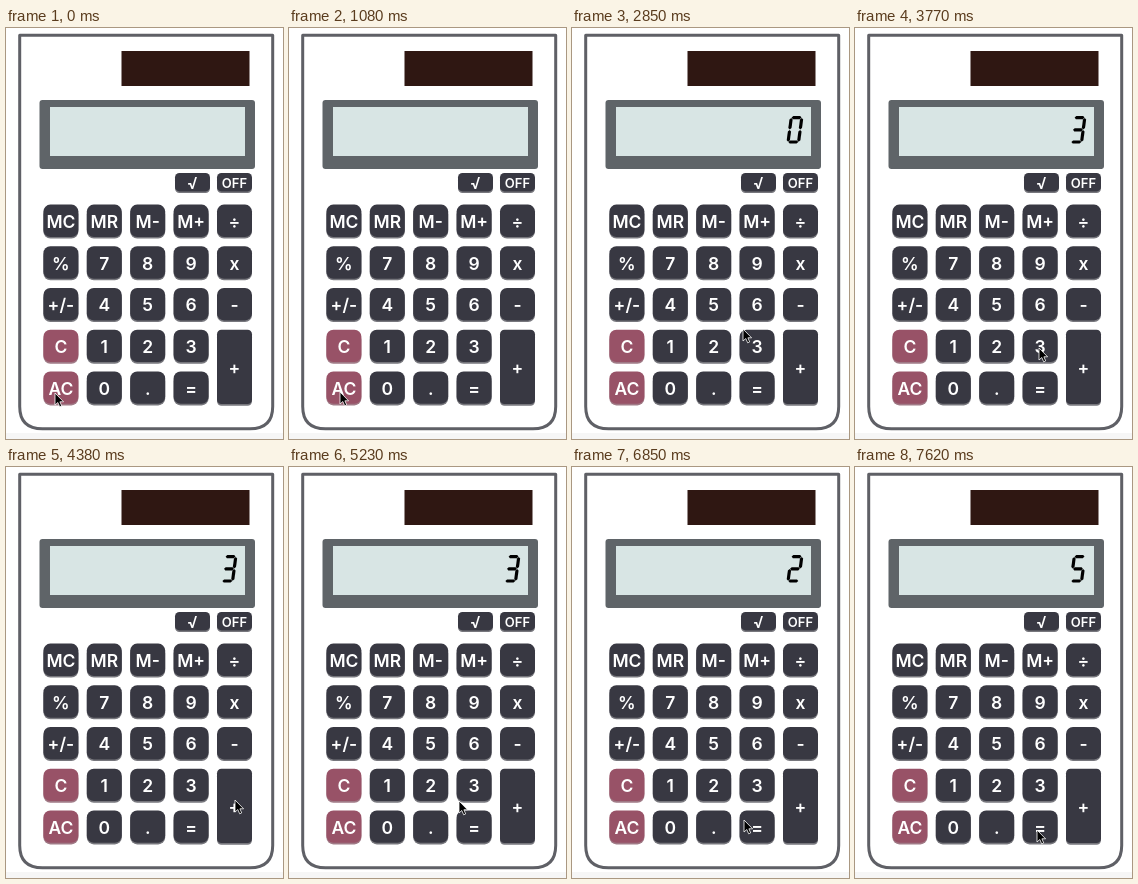
Animation of 277 by 411 pixels, one loop 8000 ms. Source, as an HTML page:

```html
<!DOCTYPE html>
<html lang="en">
<head>
<meta charset="utf-8">
<title>Calculator</title>
<style>
  html, body { margin: 0; width: 100%; height: 100%; overflow: hidden; background: #fff; }
  svg { display: block; width: 277px; height: 411px; }
  text { font: 600 17.5px Inter, "Open Sans", sans-serif; fill: #fff; text-anchor: middle; }
  .edge { fill: #77777d; }
  .face { fill: #383842; }
  .red .edge { fill: #a07a86; }
  .red .face { fill: #985267; }
  .pressed .edge { fill: #959595; }
  .pressed .face { fill: #777; }
</style>
</head>
<body>
<svg viewBox="0 0 277 411">
  <rect y="405" width="277" height="6" fill="#f6f6f6"/>
  <path d="M13.7 7.3H266.7V378.5Q266.7 400.8 244 400.8H36.5Q13.7 400.8 13.7 378.5Z" fill="#fff" stroke="#5f6066" stroke-width="3" stroke-linejoin="round"/>
  <rect x="115.5" y="23" width="128" height="35" fill="#2f1712"/>
  <rect x="33.5" y="72" width="215.5" height="69" rx="3" fill="#5f6468"/>
  <rect x="44" y="79" width="195" height="49" fill="#d8e5e4"/>
  <g id="digit" transform="translate(219.3 89.6) skewX(-7.5)"></g>
  <g id="keys"></g>
  <path id="cursor" d="M0 0V12L2.8 9.5 4.7 13.8 6.7 12.9 4.9 8.8H8.6Z" fill="#000" stroke="#fff" stroke-width=".8"/>
</svg>
<script>
const $ = id => document.getElementById(id);

function add(parent, tag, attrs, text) {
  const el = document.createElementNS("http://www.w3.org/2000/svg", tag);
  for (const name in attrs) el.setAttribute(name, attrs[name]);
  if (text) el.textContent = text;
  return parent.appendChild(el);
}

// Keypad
function key(label, x, y, height, size = 17.5) {
  const g = add($("keys"), "g", { class: /^A?C$/.test(label) ? "red" : "" });
  const rx = height === 34 ? 7 : 4.5;
  add(g, "rect", { class: "edge", x, y: y + 3, width: 35, height: height - 3, rx });
  add(g, "rect", { class: "face", x, y, width: 35, height: height - 1.6, rx });
  const text = add(g, "text", { x: x + 17.5, y: y + height / 2 + size * 0.37 - 0.2 }, label);
  text.style.fontSize = size + "px";
  return g;
}

const keys = {};
const rows = ["MC MR M- M+ ÷", "% 7 8 9 x", "+/- 4 5 6 -", "C 1 2 3 +", "AC 0 . ="];
rows.forEach((row, j) => row.split(" ").forEach((label, i) => {
  keys[label] = key(label, 37.4 + i * 43.4, 176.6 + j * 41.7, label === "+" ? 76 : 34);
}));
key("√", 169, 145, 20, 16);
key("OFF", 211, 145, 20, 13);

// Seven-segment digit: three horizontal bars and two pairs of vertical ones
const segments = {};
function segment(name, x, y, length, angle) {
  const d = `M.3 0L1.8-1.6H${length - 1.8}L${length - 0.3} 0 ${length - 1.8} 1.6H1.8Z`;
  segments[name] = add($("digit"), "path", { d, transform: `translate(${x} ${y}) rotate(${angle})` });
}
const W = 10.5, H = 12.2;
for (let row = 0; row < 3; row++) {
  segment("agd"[row], 0, row * H, W, 0);
  if (row < 2) for (let col = 0; col < 2; col++) segment("fbec"[row * 2 + col], col * W, row * H, H, 90);
}
const lit = { 0: "abcdef", 2: "abged", 3: "abgcd", 5: "afgcd" };

// Timeline in ticks of 1/13 s
const FPS = 13, LOOP = 8000;
const display = { 22: "0", 49: "3", 78: "2", 99: "5" };
const moves = [
  { from: 0, to: 2, x: 51, y: 364 },
  { from: 33, to: 37, x: 171, y: 301 },
  { from: 37, to: 45, x: 184, y: 320 },
  { from: 52, to: 57, x: 229, y: 333 },
  { from: 65, to: 68, x: 170, y: 334 },
  { from: 68, to: 72, x: 138, y: 319 },
  { from: 77, to: 78, x: 143, y: 322 },
  { from: 83, to: 91, x: 182, y: 363 }
];

function cursorAt(n) {
  let x = 49, y = 365;
  for (const m of moves) {
    const k = Math.min(1, Math.max(0, (n - m.from) / (m.to - m.from)));
    x += (m.x - x) * k;
    y += (m.y - y) * k;
  }
  return [Math.round(x), Math.round(y)];
}

function draw(n) {
  $("cursor").setAttribute("transform", `translate(${cursorAt(n)})`);
  const shown = Object.keys(display).filter(at => at <= n).pop();
  const on = lit[display[shown]] || "";
  for (const name in segments) segments[name].style.display = on.includes(name) ? "" : "none";
  keys.AC.classList.toggle("pressed", n >= 22 && n < 34);
  keys["+"].classList.toggle("pressed", n === 62);
}

const start = performance.now();
function tick(now) {
  const t = Math.max(0, now - start) % LOOP;
  draw(Math.floor(t * FPS / 1000 + 0.07));
  requestAnimationFrame(tick);
}
draw(0);
requestAnimationFrame(tick);
</script>
</body>
</html>
```
